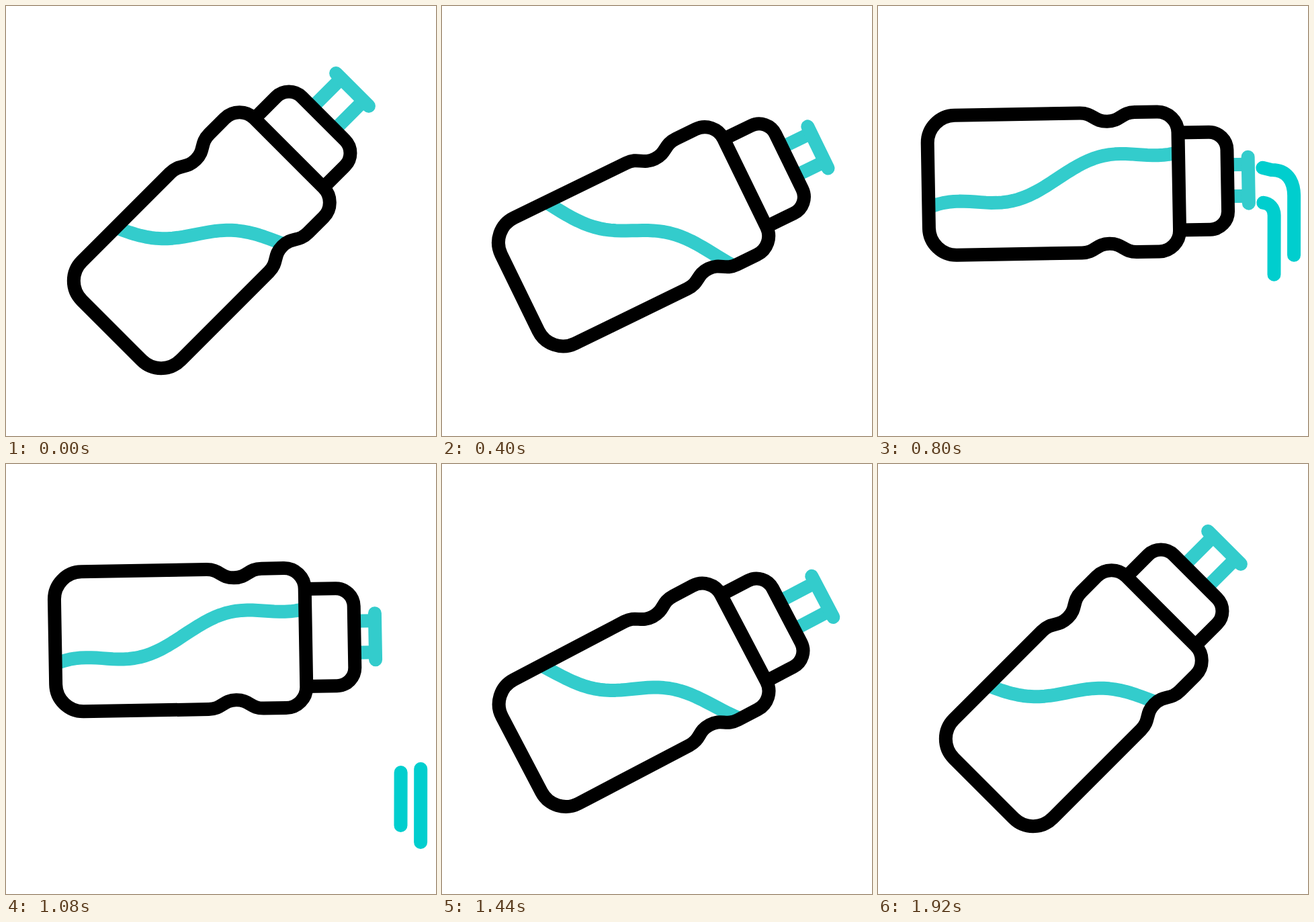
Write an HTML page that moves like this. It is 640 by 640 pixels and loops after 2 s.

```html
<!DOCTYPE html>
<html lang="en">
<head>
<meta charset="utf-8">
<title>Sports bottle</title>
<style>
  html, body { margin: 0; width: 100%; height: 100%; overflow: hidden; background: #fff; }
  svg { display: block; width: 100vw; height: 100vh; }
  path { fill: none; stroke-width: 20; stroke-linejoin: round; }
  .ink { stroke: #000; }
  .water { stroke: #33cccc; }
  .jet { stroke: #00cece; stroke-linecap: round; }
</style>
</head>
<body>
<svg viewBox="0 0 640 640">
  <defs>
    <path id="body" d="M-189-104 H-3 C17-104 18-91 38-91 S59-104 79-104 H112
      A31 31 0 0 1 143-73 V73 A31 31 0 0 1 112 104 H79
      C59 104 58 91 38 91 S17 104-3 104 H-189
      A41 41 0 0 1-230 63 V-63 A41 41 0 0 1-189-104Z"/>
    <clipPath id="inside"><use href="#body"/></clipPath>
  </defs>
  <!-- Bottle space: axis along x, centre at the origin -->
  <g id="bottle">
    <path id="tubes" class="water"/>
    <path id="bar" class="water" stroke-linecap="round"/>
    <g clip-path="url(#inside)"><path id="wave" class="water"/></g>
    <path class="ink" d="M143-72.5 H188.5 A27 27 0 0 1 215.5-45.5 V45.5 A27 27 0 0 1 188.5 72.5 H143"/>
    <use href="#body" class="ink"/>
    <path class="jet" pathLength="1" d="M268-18 L281-14.5 C304-14.5 314 2 314 24 L308 349"/>
    <path class="jet" pathLength="1" d="M268 34 C277 35 284 42 284 53 L279 312"/>
  </g>
</svg>
<script>
const LOOP = 2000, STEP = 40, RAD = Math.PI / 180;
const $ = id => document.getElementById(id);
const jets = document.querySelectorAll('.jet');

const progress = (t, a, b) => Math.min(1, Math.max(0, (t - a) / (b - a)));
const ease = p => p * p * (3 - 2 * p);
// Rises from 0 to 1 over a..b, falls back over c..d
const pulse = (t, a, b, c, d) => ease(progress(t, a, b)) - ease(progress(t, c, d));

// A sine ripple on a sloping water line, relative to the bottle centre
function wavePath(level, slope, ripple) {
  const middle = -37, wavelength = 240;
  const points = [];
  for (let x = -240; x <= 200; x += 8) {
    const dx = x - middle;
    const y = level + slope * dx - ripple * Math.sin(2 * Math.PI * dx / wavelength);
    points.push(`${x} ${y.toFixed(2)}`);
  }
  return 'M' + points.join('L');
}

function draw(t) {
  const tip = pulse(t, 200, 640, 1120, 1680);
  const turn = 44 * tip, angle = turn - 45;
  const cos = Math.cos(turn * RAD), sin = Math.sin(turn * RAD);
  // Swing around a pivot a little below and left of the centre
  const armX = 16.4, armY = -10.4;
  const x = 320 - armX + armX * cos - armY * sin - 19.6 * pulse(t, 580, 850, 1100, 1345);
  const y = 320 - armY + armX * sin + armY * cos - 73.3 * pulse(t, 515, 835, 1100, 1420);
  $('bottle').setAttribute('transform', `translate(${x} ${y}) rotate(${angle})`);

  const nozzle = 276.5 - 30 * pulse(t, 200, 640, 1120, 1480);
  $('tubes').setAttribute('d', `M215-23.5H${nozzle}M215 23.5H${nozzle}`);
  $('bar').setAttribute('d', `M${nozzle}-34.5V34.5`);

  // The water lags behind the bottle and overshoots on the way back
  const lag = 50 - 65.4 * pulse(t, 320, 700, 1120, 1585)
    + 8.2 * Math.sin(Math.PI * progress(t, 1320, 1920));
  const slope = Math.tan((lag + angle) * RAD);
  $('wave').setAttribute('transform', `rotate(${-angle})`);
  $('wave').setAttribute('d', wavePath(20 - 27 * tip, slope, 11 + 3 * tip));

  const head = progress(t, 570, 1140), tail = progress(t, 820, 1240);
  for (const jet of jets) {
    jet.style.display = head > tail ? '' : 'none';
    jet.setAttribute('stroke-dasharray', `${head - tail} 2`);
    jet.setAttribute('stroke-dashoffset', -tail);
  }
}

const start = performance.now();
function frame() {
  const t = (performance.now() - start) % LOOP;
  draw(Math.floor(t / STEP) * STEP);
  requestAnimationFrame(frame);
}
frame();
</script>
</body>
</html>
```
